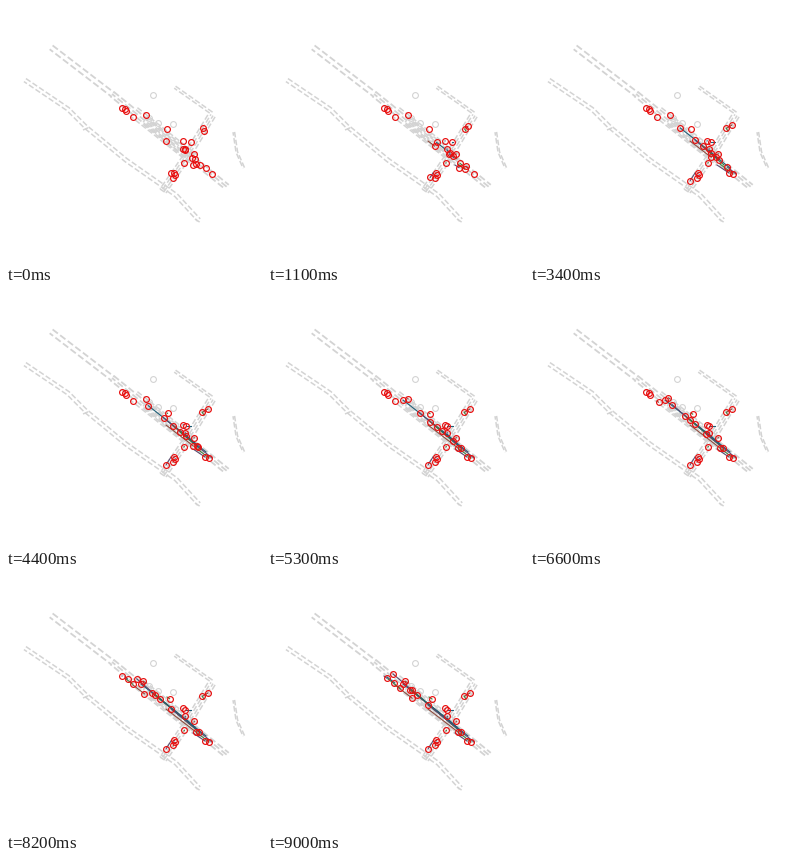
Animation of 256 by 256 pixels, one loop 9.1 s. Source, as a matplotlib script:

```python
import numpy as np
import matplotlib.pyplot as plt
from matplotlib.animation import FuncAnimation

SIZE, DPI = 256, 72          # at 72 dpi one point is one pixel
FRAMES, STEP = 91, 100
LOOP_END = (FRAMES - 1) * STEP / 1000
GRAY, RED = "#d3d3d3", "#e81010"
TRAILS = ["#1f5f78", "#5a4a6e", "#8c4a3c", "#3c7d3c"]
clock = np.arange(FRAMES) * STEP / 1000


def run_up(t, lag):
    """Distance covered at unit speed when pulling away with a time lag."""
    t = np.maximum(t, 0)
    return t - lag * (1 - np.exp(-t / lag))


def travel(a, b, start=0, end=LOOP_END, lag=0.05):
    """Path from a to b between two times, standing still outside them."""
    a, b = np.array(a, float), np.array(b, float)
    t = np.clip(clock, start, end) - start
    part = run_up(t, lag) / run_up(end - start, lag)
    return a + part[:, None] * (b - a)


def pull_away(a, start, speed=9, lag=0.6):
    """Path of a queued car that sets off along the main road."""
    heading = np.array([0.79, 0.61])
    return a + speed * run_up(clock - start, lag)[:, None] * heading


westbound = [
    travel((177, 143), (135, 110), end=5.3),
    travel((186, 152), (125, 100), lag=0.5),
    travel((189, 153), (142, 116), lag=0.4),
    travel((194, 159), (144, 116), lag=1.6),
    travel((200, 162), (149, 121), lag=1.6),
    travel((206, 168), (160, 131), start=1.4, lag=0.8),
]
eastbound = [
    travel((160, 135), (190, 158), end=4.8),
    travel((190, 158), (203, 168), end=2.1),
    travel((179, 144), (193, 158), end=4.8),
    travel((187, 159), (199, 167), end=3.2),
]
queue = [(127, 111), (120, 105), (119, 103), (116, 102)]
queued = [pull_away(p, 6 + 0.7 * k) for k, p in enumerate(queue)]
crossing = [
    travel((197, 122), (202, 119), end=1.8),
    travel((198, 125), (196, 122), end=1.8),
    travel((185, 136), (179, 136), end=5),
    travel((165, 167), (160, 175), end=2),
    travel((140, 109), (137, 107), start=4.8, end=8.2),
    travel((161, 123), (164, 125), start=3.4),
]
waiting = [(177, 135), (179, 143), (188, 148), (178, 157),
           (168, 167), (169, 169), (167, 172)]
creeping = [travel((x, y), (x + 0.4, y - 0.6)) for x, y in waiting]
paths = np.array(westbound + eastbound + queued + crossing + creeping)

fig = plt.figure(figsize=(SIZE / DPI, SIZE / DPI), dpi=DPI, facecolor="white")
ax = fig.add_axes([0, 0, 1, 1])
ax.set(xlim=(0, SIZE), ylim=(SIZE, 0))
ax.axis("off")


def road(points, offsets=(0,), width=1.5):
    """Dashed lines parallel to a polyline, each shifted sideways."""
    pts = np.array(points, float)
    tangent = np.gradient(pts, axis=0)
    tangent /= np.linalg.norm(tangent, axis=1, keepdims=True)
    normal = np.column_stack([-tangent[:, 1], tangent[:, 0]])
    for k, d in enumerate(offsets):
        x, y = (pts + d * normal).T
        ax.plot(x, y, color=GRAY, lw=width, ls=(1.3 * k, (3.7, 1.6)), zorder=1)


def circles(color, width, zorder):
    line, = ax.plot([], [], "o", ms=5.8, mfc="none", mec=color, mew=width,
                    snap=False, zorder=zorder)
    return line


# main road: approach, whole width, extra lanes before the junction
road([(45, 41.5), (107, 89)], (-2.6, 2.2), width=1.8)
road([(106, 88), (221, 181)], (-2.8, 0, 2.8), width=1.8)
road([(128, 106), (190, 155)], (-5.5, 5.5))
road([(138, 114), (186, 152)], (-4, -1.5, 1.5, 4))
# cross street, its end and its side branch
road([(206, 109), (181, 150), (157, 185)], (-3.6, -1.2, 1.2, 3.6))
road([(154, 183), (160, 187)])
road([(169, 81), (206, 107)], (-1, 1.4))
# curved street and the short one on the right
road([(19, 74), (62, 103), (80, 121), (120, 154), (170, 189), (193, 214)],
     (-1.7, 1.9))
road([(77, 124), (84, 121)])
road([(189, 213), (195, 217)])
road([(228, 126), (231, 146), (238, 162)], (-0.6, 1))

circles(GRAY, 1.1, 2).set_data([147, 167, 152, 143], [89, 118, 117, 112])
trails = [ax.plot([], [], color=TRAILS[i % len(TRAILS)], lw=1.1, zorder=3)[0]
          for i in range(len(paths))]
rings = circles(RED, 1.2, 4)


def draw(i):
    for line, path in zip(trails, paths):
        line.set_data(*path[:i + 1].T)
    rings.set_data(*paths[:, i].T)
    return [*trails, rings]


anim = FuncAnimation(fig, draw, frames=FRAMES, init_func=lambda: draw(0),
                     interval=STEP, repeat=True, repeat_delay=0)
plt.show()
```
